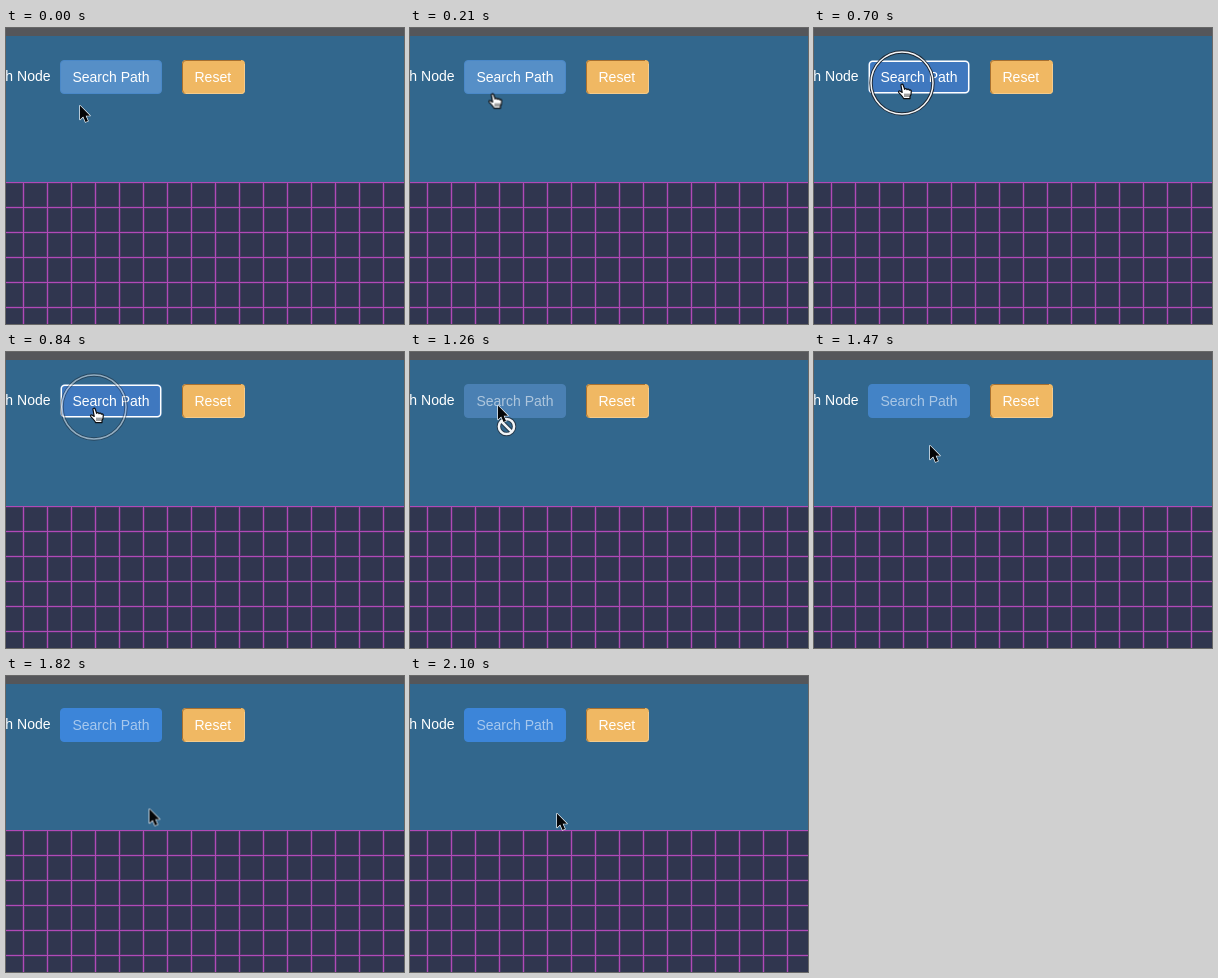
An HTML page for the animation above (2240 ms loop, 398 by 296 pixels).

```html
<!DOCTYPE html>
<html lang="en">
<head>
<meta charset="utf-8">
<title>Search path</title>
<style>
  html, body { margin: 0; width: 100%; height: 100%; overflow: hidden; background: #30364f; }
  svg { display: block; width: 398px; height: 296px; }
  text { font: 14px "Liberation Sans", Arial, sans-serif; fill: #fff; }

  /* One loop is 32 ticks of 70 ms; each tick is 3.125 %. */
  .anim { animation: 2240ms step-end infinite; }
  #pointer { animation-name: move; }
  #arrow { animation-name: arrow; }
  #hand { animation-name: hand; }
  #blocked { animation-name: blocked; }
  #ring { animation-name: ring; }
  #fill { animation-name: fill; }
  #focus { animation-name: focus; }
  #label { animation-name: label; }

  @keyframes move {
    0% { transform: translate(73px, 76px); animation-timing-function: steps(5); }
    15.625%, 56.25% { transform: translate(87px, 52px); }
    59.375% { transform: translate(94px, 62px); animation-timing-function: steps(2); }
    65.625% { transform: translate(115px, 92px); animation-timing-function: steps(2); }
    71.875% { transform: translate(132px, 114px); }
    75% { transform: translate(139px, 127px); animation-timing-function: steps(4); }
    87.5%, 100% { transform: translate(146px, 136px); }
  }
  @keyframes arrow {
    0% { opacity: 1; }
    9.375% { opacity: 0; }
    40.625%, 100% { opacity: 1; }
  }
  @keyframes hand {
    0% { opacity: 0; }
    9.375% { opacity: 1; }
    40.625%, 100% { opacity: 0; }
  }
  @keyframes blocked {
    0% { opacity: 0; }
    40.625% { opacity: 1; }
    62.5%, 100% { opacity: 0; }
  }
  @keyframes ring {
    0% { opacity: 0; --r: 30px; }
    28.125% { opacity: 1; --r: 30px; }
    31.25% { opacity: 1; --r: 31px; }
    37.5% { opacity: .5; --r: 32px; }
    40.625%, 100% { opacity: 0; --r: 32px; }
  }
  #ring circle { r: var(--r); }
  @keyframes fill {
    0%, 9.375% { fill: #568fc7; stroke: #4a88c8; animation-timing-function: steps(3); }
    18.75% { fill: #4a7aaa; stroke: #3b6f9d; }
    28.125% { fill: #3f78bf; stroke: #3a6f9f; }
    40.625% { fill: #4a80b3; stroke: #4a80b3; }
    59.375% { fill: #4a80b3; stroke: #4a80b3; animation-timing-function: steps(4); }
    71.875%, 100% { fill: #3c85d9; stroke: #3c85d9; }
  }
  @keyframes focus {
    0% { opacity: 0; }
    28.125% { opacity: 1; }
    40.625%, 100% { opacity: 0; }
  }
  @keyframes label {
    0% { opacity: 1; }
    40.625%, 100% { opacity: .55; }
  }
</style>
</head>
<body>
<svg viewBox="0 0 398 296">
  <defs>
    <pattern id="grid" width="24" height="25" x="5" y="142" patternUnits="userSpaceOnUse">
      <rect width="24" height="25" fill="#30364f"/>
      <path d="M12.5 0V25M0 12.5H24" stroke="#a03cae" stroke-width="3" opacity=".2"/>
      <path d="M12.5 0V25M0 12.5H24" stroke="#b04ab6" stroke-width="1.1"/>
    </pattern>
  </defs>

  <rect width="398" height="154" fill="#32678d"/>
  <rect width="398" height="8" fill="#55565a"/>
  <rect y="154" width="398" height="142" fill="url(#grid)"/>

  <text x="44.5" y="53" text-anchor="end">h Node</text>

  <rect id="fill" class="anim" x="54.5" y="32.5" width="101" height="33" rx="3.5"/>
  <rect id="focus" class="anim" x="55.3" y="33.3" width="99.4" height="31.4" rx="3.5" fill="none" stroke="#fff" stroke-width="1.5"/>
  <text id="label" class="anim" x="66.4" y="54">Search Path</text>

  <rect x="176" y="32" width="63" height="34" rx="4" fill="#f0b863"/>
  <path d="M180 65.5H235.5a3 3 0 0 0 3-3V36" fill="none" stroke="#f4cb8c"/>
  <path d="M235 32.5H180a3.5 3.5 0 0 0-3.5 3.5V62a3.5 3.5 0 0 0 2 3" fill="none" stroke="#a8702f"/>
  <text x="188.5" y="54">Reset</text>

  <g id="ring" class="anim" fill="none">
    <circle cx="88" cy="55" stroke="#1d2733" stroke-width="3.4"/>
    <circle cx="88" cy="55" stroke="#f4f6f8" stroke-width="1.5"/>
  </g>

  <g id="pointer" class="anim">
    <g id="blocked" class="anim" fill="none">
      <g stroke="#26384a" stroke-width="4.4">
        <circle cx="9.5" cy="22.5" r="7.6"/>
        <path d="M4.1 17.1L14.9 27.9"/>
      </g>
      <g stroke="#f2f5f8" stroke-width="2.5">
        <circle cx="9.5" cy="22.5" r="7.6"/>
        <path d="M4.1 17.1L14.9 27.9"/>
      </g>
    </g>
    <path id="arrow" class="anim" d="M1 1.6V15.6L4.2 12.6L6.5 18L9 16.9L6.7 11.7H11Z" fill="#050608" stroke="#fff" stroke-width="1.3" stroke-linejoin="round" paint-order="stroke"/>
    <g id="hand" class="anim" stroke="#0b0d10" stroke-linejoin="round" stroke-linecap="round">
      <path d="M0 5.6C-.5 4.2 1.6 3.6 2.2 5L3.6 9V9.3C4 8.2 5.8 8.4 6 9.6C6.6 8.7 8.1 9 8.3 10.2C9.2 9.6 10.4 10.2 10.3 11.5C10.3 14 10 15.2 9 16.6V18.6H2.6C2 16.8 .3 15.2-2 12.9C-3.2 11.6-1.9 10.4-.6 11.2L1.2 12.4Z" fill="#fff" stroke-width="1.2"/>
      <path d="M4 14V16.6M6 14V16.6M8 14V16.6" fill="none" stroke-width=".8"/>
    </g>
  </g>
</svg>
</body>
</html>
```
